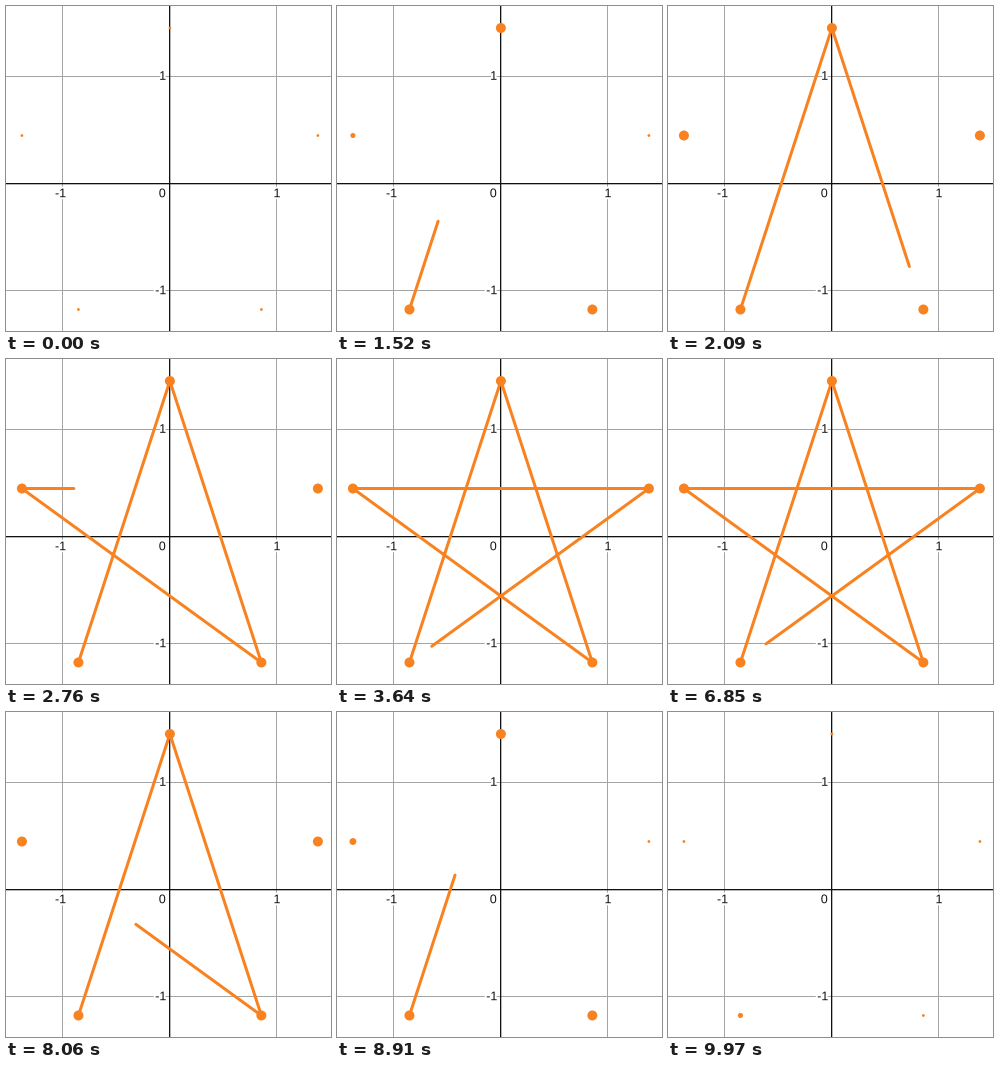
Animation, 325 px wide and 325 px high, one loop 10 s. Source, as a matplotlib script:

```python
import math

import matplotlib.pyplot as plt
from matplotlib.animation import FuncAnimation
from matplotlib.patches import Circle
from matplotlib.patheffects import withStroke

SIZE, DPI = 325, 100
LOOP, STEP = 10000, 20
PT = 72 / DPI                      # points per pixel
AXIS_X, AXIS_Y, UNIT = 163.5, 177.5, 107
STAR_X, STAR_Y, RADIUS = 163.9, 177.6, 155.6
ORANGE = "#f8821f"
DOT_MIN, DOT_MAX = 1.4, 5.0

fig = plt.figure(figsize=(SIZE / DPI, SIZE / DPI), dpi=DPI, facecolor="white")
ax = fig.add_axes([0, 0, 1, 1])
ax.set_xlim(0, SIZE)
ax.set_ylim(SIZE, 0)
ax.axis("off")


def rule(offset, color, width):
    """One vertical and one horizontal line at an offset from the origin."""
    style = dict(color=color, lw=width * PT, zorder=1, snap=False)
    ax.plot([AXIS_X + offset] * 2, [-5, SIZE + 5], **style)
    ax.plot([-5, SIZE + 5], [AXIS_Y + offset] * 2, **style)


def label(x, baseline, text, align="center"):
    ax.text(x, baseline, text, ha=align, va="baseline", color="#111111",
            family="Liberation Sans", fontsize=12.5 * PT, zorder=2,
            path_effects=[withStroke(linewidth=4 * PT, foreground="white")])


for side in (-UNIT, UNIT):
    rule(side, "#a4a4a4", 1)
label(54.5, 191.2, "-1")
label(156.3, 191.2, "0")
label(271, 191.2, "1")
label(160.2, 73.8, "1", "right")
label(160.2, 288.2, "-1", "right")
rule(0.15, "#111111", 1.3)

# Star corners in drawing order, starting at the lower left.
corners = []
for k in range(5):
    a = math.radians(216 + 144 * k)
    corners.append((STAR_X + RADIUS * math.sin(a),
                    STAR_Y - RADIUS * math.cos(a)))

star, = ax.plot([], [], color=ORANGE, lw=3 * PT, zorder=4,
                solid_capstyle="round", solid_joinstyle="round")
dots = [ax.add_patch(Circle(c, DOT_MIN, fc=ORANGE, lw=0, zorder=5))
        for c in corners]


def clamp(v, low=0, high=1):
    return max(low, min(high, v))


def star_path(progress):
    """Polyline through the corners, each edge eased at both ends."""
    if progress <= 0:
        return [], []
    edge = min(int(progress), 4)
    u = clamp(progress - edge)
    u = u * u * (3 - 2 * u)
    (x0, y0), (x1, y1) = corners[edge], corners[(edge + 1) % 5]
    tip = (x0 + (x1 - x0) * u, y0 + (y1 - y0) * u)
    return zip(*corners[:edge + 1], tip)


def update(i):
    swing = max(0, math.sin(math.pi * (i * STEP - 235) / LOOP)) ** 1.1
    for k, dot in enumerate(dots):
        grow = clamp((swing - 0.05 - 0.097 * k) / 0.055)
        dot.set_radius(DOT_MIN + (DOT_MAX - DOT_MIN) * grow)
    xs, ys = star_path(8.74 * swing - 2.754)
    star.set_data(list(xs), list(ys))
    return [star, *dots]


anim = FuncAnimation(fig, update, frames=LOOP // STEP, interval=STEP,
                     repeat=True, repeat_delay=0)
plt.show()
```
